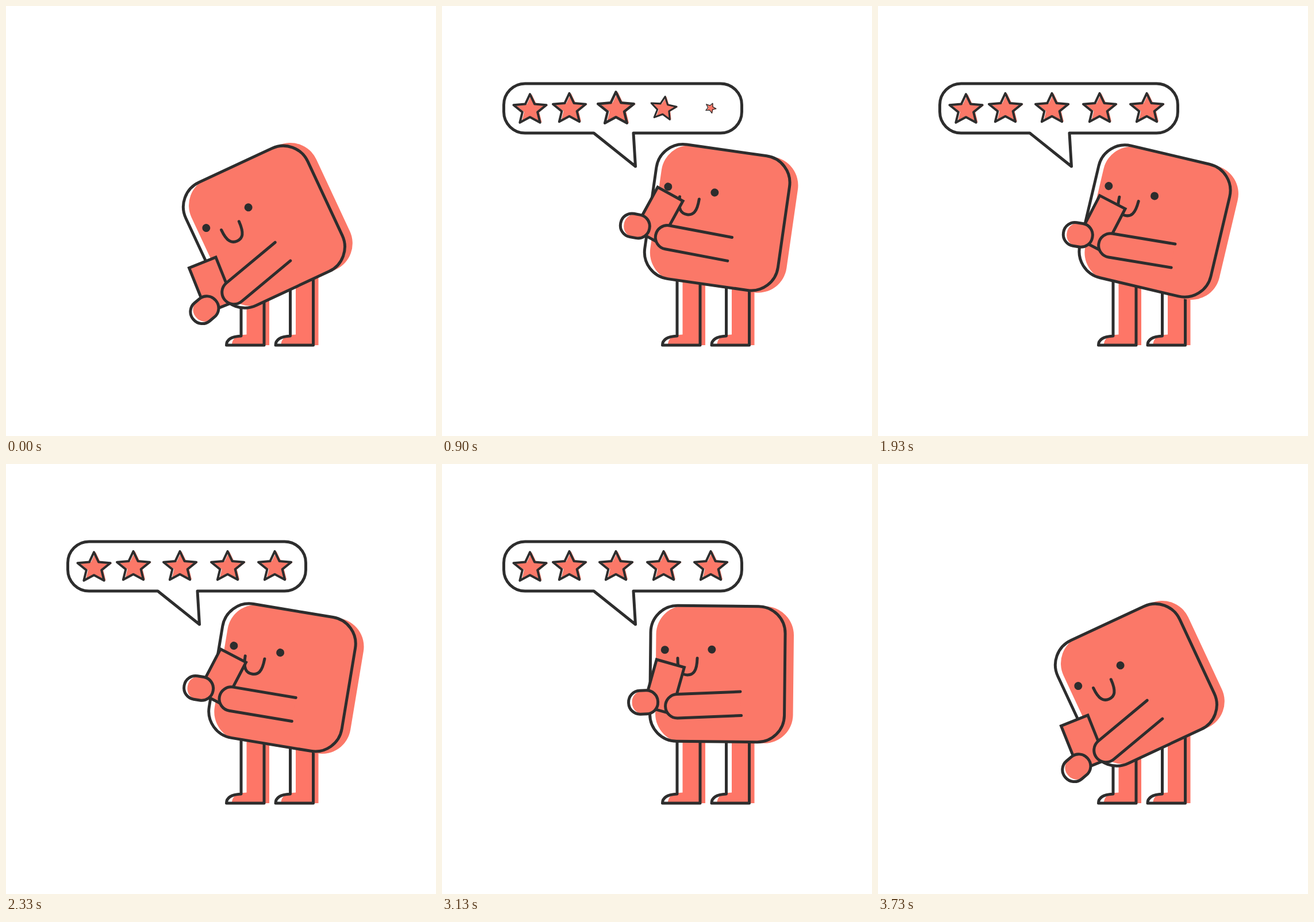
Animation, 748 px wide and 748 px high, one loop 5.76 s. Source, as an HTML page:

```html
<!DOCTYPE html>
<html lang="en">
<head>
<meta charset="utf-8">
<title>Five star review</title>
<style>
  html, body { margin: 0; width: 100%; height: 100%; overflow: hidden; background: #fff; }
  svg { display: block; width: 100%; height: 100%; }
  .line { fill: none; stroke: #2d2d2d; stroke-width: 5; stroke-linecap: round; stroke-linejoin: round; }
  .coral, .line.solid { fill: #fb7868; }
  .leg { fill: #fe7667; }
  .white { fill: #fff; }
  .dark { fill: #2d2d2d; }
  .thin { stroke-width: 4; }
  .sharp { stroke-linejoin: miter; }
</style>
</head>
<body>
<svg viewBox="0 0 748 748" xmlns="http://www.w3.org/2000/svg">
  <defs>
    <g id="leg">
      <path class="leg" d="M418.500 440V571.500C402 572 393 578 393 590H458V440Z"/>
      <path class="line" d="M409 440V574C392 575 383.500 580 383.500 590H449V440"/>
    </g>
  </defs>

  <g id="bubble">
    <path class="line" d="M144.500 135H484.500A37 37 0 0 1 521.500 172V184A37 37 0 0 1 484.500 221H333L336.500 279L264 221H144.500A37 37 0 0 1 107.500 184V172A37 37 0 0 1 144.500 135Z"/>
    <g id="stars"></g>
  </g>

  <use href="#leg"/>
  <use href="#leg" x="85.500"/>

  <g id="body">
    <rect class="white" x="-117" y="-118" width="234" height="236" rx="47"/>
    <rect class="coral" x="-107.500" y="-118" width="239.500" height="238" rx="50"/>
    <rect class="line" x="-117" y="-118" width="234" height="236" rx="47"/>
    <circle class="dark" cx="-92" cy="-40.800" r="7"/>
    <circle class="dark" cx="-10.400" cy="-42.200" r="7"/>
    <path class="line" d="M-69.600 -26.500C-69.600 -4 -63 2.500 -52.500 2.500S-36 -4 -35.500 -27"/>
    <g id="arm">
      <rect class="line solid sharp" width="50" height="84" transform="translate(-143.300 -61.700) rotate(18)"/>
      <g transform="translate(-169.500 11.700)">
        <rect class="white" x="-25.500" y="-20.500" width="51" height="41" rx="20"/>
        <rect class="coral" x="-19.500" y="-20" width="45" height="40" rx="19"/>
        <rect class="line" x="-25.500" y="-20.500" width="51" height="41" rx="20"/>
      </g>
      <path class="line solid" d="M0 0H-110.500A20.800 20.800 0 0 0 -110.500 41.600H0"/>
    </g>
  </g>
</svg>
<script>
const LOOP = 5760, LAST_STEP = 75;
const $ = id => document.getElementById(id);
const clamp = v => Math.min(1, Math.max(0, v));
const smooth = (a, b, v) => { const u = clamp((v - a) / (b - a)); return u * u * (3 - 2 * u); };

// Key poses: body angle and centre, arm position on the body, absolute arm angle.
const steps = [0, 10, 27, 39, 55, 63, LAST_STEP];
const pose = {
  tilt: [-25, 5.6, 10, 13.3, 3.7, 0.6, -25],
  x: [448.9, 472, 482, 481.5, 479.5, 479.3, 448.9],
  y: [384.2, 366, 371, 374, 367.5, 365, 384.2],
  armX: [6, 12.6, 47, 43.7, 16.5, 40, 6],
  armY: [32.6, 31, 30.6, 30.8, 30.5, 30.6, 32.6],
  arm: [-39.8, 3.7, 13.9, 9.4, 9.7, -2.3, -39.8]
};

// Monotone cubic interpolation, at rest at both ends.
function curve(values, s) {
  const n = steps.length - 1;
  const secant = i => (values[i + 1] - values[i]) / (steps[i + 1] - steps[i]);
  const slope = i => {
    if (i === 0 || i === n) return 0;
    const a = secant(i - 1), b = secant(i);
    return a * b <= 0 ? 0 : 2 * a * b / (a + b);
  };
  let i = 0;
  while (i < n - 1 && s >= steps[i + 1]) i++;
  const h = steps[i + 1] - steps[i], u = (s - steps[i]) / h;
  const w = u * u * (3 - 2 * u);
  return values[i] * (1 - w) + values[i + 1] * w +
    h * u * (1 - u) * ((1 - u) * slope(i) - u * slope(i + 1));
}

function starPath() {
  const points = [];
  for (let i = 0; i < 10; i++) {
    const a = Math.PI * (i / 5 - 0.5), k = i % 2 ? 0.46 : 1;
    points.push((30 * k * Math.cos(a)).toFixed(2) + " " + (2.7 + 27.3 * k * Math.sin(a)).toFixed(2));
  }
  return "M" + points.join("L") + "Z";
}

const star = starPath();
const places = [[153, 178], [221.5, 176.5], [302.5, 176.5], [385.5, 176.5], [467.5, 176.5]];
$("stars").innerHTML = places.map(() =>
  `<g><path class="coral" transform="translate(3 0)" d="${star}"/><path class="line thin" d="${star}"/></g>`).join("");
const stars = [...$("stars").children];

// Linear growth followed by a small overshoot.
function popScale(u) {
  if (u <= 0) return 0;
  if (u >= 1.5) return 1;
  return u < 1 ? u : 1 + 0.1 * Math.sin((u - 1) * 2 * Math.PI);
}

function draw(t) {
  // Steps last 30 and 70 ms in turn.
  const s = Math.min(LAST_STEP, 2 * Math.floor(t / 100) + (t % 100 >= 30 ? 1 : 0));
  const at = key => curve(pose[key], s);
  const tilt = at("tilt");
  $("body").setAttribute("transform", `translate(${at("x")} ${at("y")}) rotate(${tilt})`);
  $("arm").setAttribute("transform", `translate(${at("armX")} ${at("armY")}) rotate(${at("arm") - tilt})`);

  const size = smooth(1, 10.8, s) * (1 - smooth(63, 72, s));
  $("bubble").style.display = size > 0 ? "" : "none";
  $("bubble").setAttribute("transform",
    `translate(336.500 279) rotate(${56 * (1 - size)}) scale(${size}) translate(-336.500 -279)`);

  stars.forEach((el, i) => {
    const k = popScale((s - 3.8 - 3 * i) / 6.7);
    const [x, y] = places[i];
    el.style.display = k > 0 ? "" : "none";
    el.setAttribute("transform", `translate(${x} ${y}) rotate(${36 * (1 - Math.min(1, k))}) scale(${k})`);
  });
}

const start = performance.now();
function tick() {
  draw((performance.now() - start) % LOOP);
  requestAnimationFrame(tick);
}
tick();
</script>
</body>
</html>
```
